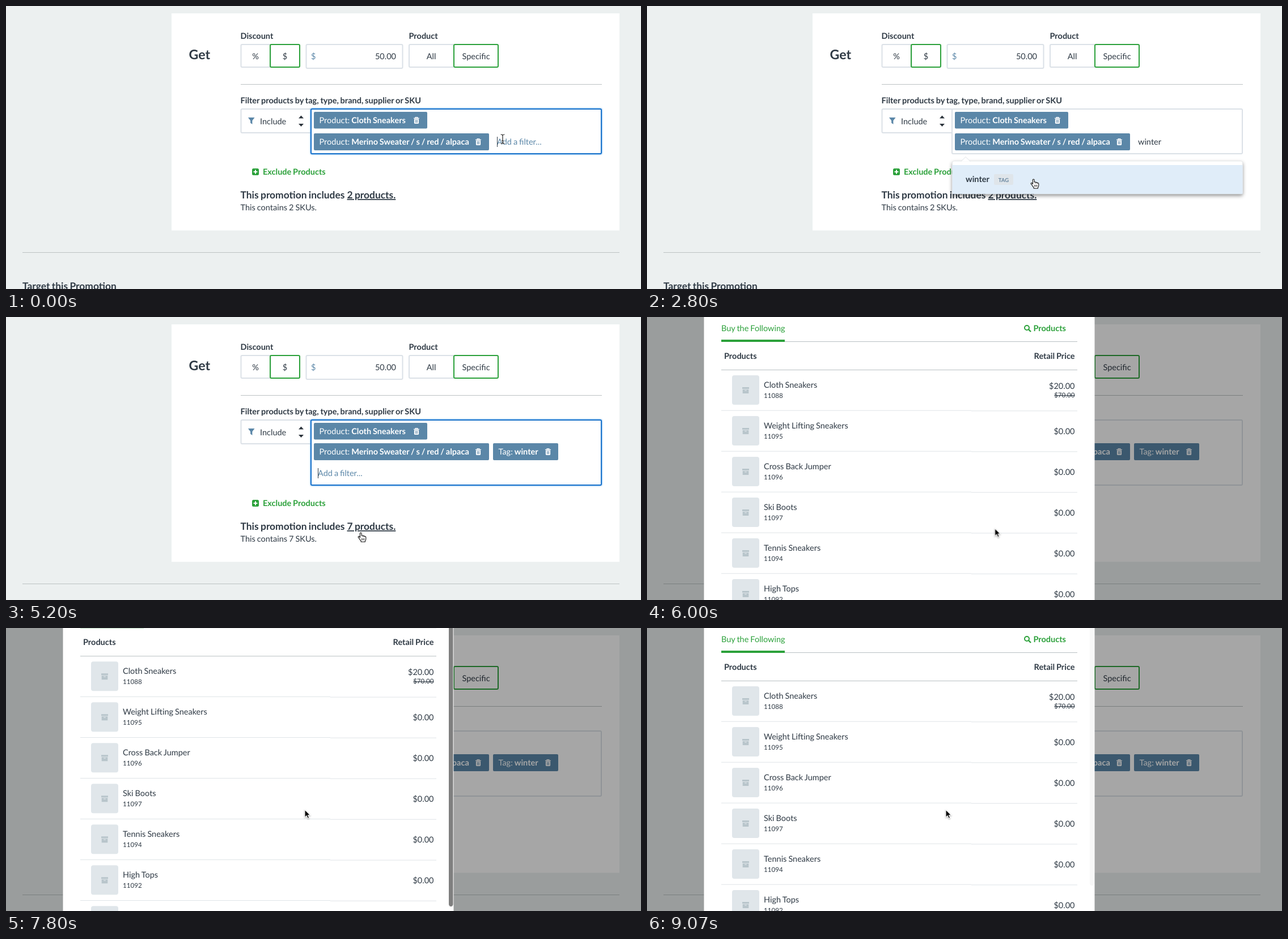
An HTML page that plays this animation: 1120x500 px, repeating every 9.34 s.

```html
<!DOCTYPE html>
<html lang="en">
<head>
<meta charset="utf-8">
<title>Promotion editor</title>
<style>
html, body { margin: 0; width: 100%; height: 100%; overflow: hidden; background: #ecf0f0; }
svg { display: block; width: 1120px; height: 500px; }
text {
  font: 14.5px Lato, "Open Sans", sans-serif; word-spacing: -.05em;
  fill: #2f3a45; white-space: pre; text-rendering: geometricPrecision;
}
.b { font-weight: 700; }
.h { font-size: 17.4px; font-weight: 700; }
.sm { font-size: 11.6px; }
.end { text-anchor: end; }
.mid { text-anchor: middle; }
.u { text-decoration: underline; }
.slate { fill: #5b87a8; }
.green { fill: #2ca13b; }
.white { fill: #fff; }
.line { fill: #fff; stroke: #dbe1e7; stroke-width: 2; }
.on { fill: none; stroke: #2ca13b; stroke-width: 2; }

.a { animation: 9340ms step-end infinite; }
.lower { animation-name: lower; }
.chip2 { animation-name: lift; }
.grow { animation-name: grow; }
.focus { animation-name: focus; filter: drop-shadow(0 0 1.5px #3d9bf0); }
.tag { animation-name: tag; }
.count2 { animation-name: count2; }
.count7 { animation-name: count7; }
.hint1 { animation-name: hint1; }
.hint2 { animation-name: hint2; }
.typed { animation-name: typed; }
.key { animation-name: key; }
.last { animation-name: last; }
.caret { animation-name: caret; }
.drop { animation-name: drop; }
.hover { animation-name: hover; }
.shade { animation-name: shade; animation-timing-function: linear; }
.modal { animation-name: modal; animation-timing-function: ease-out; }
.scroll { animation-name: scroll; animation-timing-function: linear; }
.thumb { animation-name: thumb; animation-timing-function: linear; }
.bar { animation-name: bar; animation-timing-function: linear; }
.mouse { animation-name: mouse; animation-timing-function: ease-in-out; }
.ibeam { animation-name: ibeam; }
.arrow { animation-name: arrow; }
.hand { animation-name: hand; }

@keyframes lower { 0% { transform: none } 32.12%, 100% { transform: translateY(36px) } }
@keyframes lift { 0% { transform: none } 32.12%, 100% { transform: translateY(-2px) } }
@keyframes grow { 0% { height: 79px } 32.12%, 100% { height: 115px } }
@keyframes focus { 0% { opacity: 1 } 29.98% { opacity: 0 } 32.87% { opacity: 1 } 56.42%, 100% { opacity: 0 } }
@keyframes tag { 0% { opacity: 0 } 32.12%, 100% { opacity: 1 } }
@keyframes count2 { 0% { opacity: 1 } 34.26%, 100% { opacity: 0 } }
@keyframes count7 { 0% { opacity: 0 } 34.26%, 100% { opacity: 1 } }
@keyframes hint1 { 0% { opacity: 1 } 6.42%, 100% { opacity: 0 } }
@keyframes hint2 { 0% { opacity: 0 } 32.12%, 100% { opacity: 1 } }
@keyframes typed { 0% { opacity: 0 } 6.42% { opacity: 1 } 32.12%, 100% { opacity: 0 } }
@keyframes key { 0% { opacity: 1 } 50%, 100% { opacity: 0 } }
@keyframes last { 0% { opacity: .6 } 14.24%, 100% { opacity: 1 } }
@keyframes caret {
  0% { opacity: 1; transform: none }
  .75% { opacity: 0; transform: none }
  6.42% { opacity: 1; transform: translateX(11px) }
  7.82% { opacity: 1; transform: translateX(15px) }
  9.31% { opacity: 1; transform: translateX(23px) }
  10.71% { opacity: 1; transform: translateX(28px) }
  12.1% { opacity: 1; transform: translateX(36px) }
  14.24% { opacity: 1; transform: translateX(42px) }
  19.59% { opacity: 0; transform: translateX(42px) }
  24.95% { opacity: 1; transform: translateX(42px) }
  29.98% { opacity: 0; transform: translateX(42px) }
  32.12% { opacity: 1; transform: translate(-316px, 36px) }
  37.15% { opacity: 0; transform: translate(-316px, 36px) }
  42.83% { opacity: 1; transform: translate(-316px, 36px) }
  48.18% { opacity: 0; transform: translate(-316px, 36px) }
  53.53% { opacity: 1; transform: translate(-316px, 36px) }
  56.42%, 100% { opacity: 0; transform: translate(-316px, 36px) }
}
@keyframes drop { 0% { opacity: 0 } 10.71% { opacity: 1 } 32.12%, 100% { opacity: 0 } }
@keyframes hover { 0% { opacity: 0 } 23.13% { opacity: 1 } 32.12%, 100% { opacity: 0 } }
@keyframes shade { 0%, 57.82% { opacity: 0 } 59.96%, 100% { opacity: 1 } }
@keyframes modal {
  0%, 58.57% { opacity: 0; transform: translateY(-40px) }
  62.1%, 100% { opacity: 1; transform: none }
}
@keyframes scroll {
  0%, 72.06% { transform: translateY(45px) }
  74.2% { transform: none }
  75.7%, 82.12% { transform: translateY(-4px) }
  88.54% { transform: translateY(20px) }
  92.08%, 100% { transform: translateY(45px) }
}
@keyframes thumb {
  0%, 72.06% { transform: translateY(-38px) }
  74.2% { transform: none }
  75.7%, 82.12% { transform: translateY(3px) }
  88.54% { transform: translateY(-17px) }
  92.08%, 100% { transform: translateY(-38px) }
}
@keyframes bar { 0%, 72% { opacity: 0 } 72.1%, 92.83% { opacity: 1 } 97.1%, 100% { opacity: .06 } }
@keyframes mouse {
  0%, 17.13% { transform: translate(876px, 235px) }
  27.84%, 42.08% { transform: translate(682px, 306px) }
  51.39%, 62.85% { transform: translate(626px, 381px) }
  68.52%, 100% { transform: translate(527px, 321px) }
}
@keyframes ibeam { 0% { opacity: 1 } 6.42% { opacity: 0 } 17.13% { opacity: 1 } 21.63%, 100% { opacity: 0 } }
@keyframes arrow {
  0% { opacity: 0 } 21.63% { opacity: 1 } 23.13% { opacity: 0 } 32.12% { opacity: 1 }
  48.18% { opacity: 0 } 59.96%, 100% { opacity: 1 }
}
@keyframes hand { 0% { opacity: 0 } 23.13% { opacity: 1 } 32.12% { opacity: 0 } 48.18% { opacity: 1 } 59.96%, 100% { opacity: 0 } }
</style>
</head>
<body>
<svg viewBox="0 0 1120 500">
  <defs>
    <g id="bin">
      <path d="M3.2 2V.6H6.8V2M0 2.3H10" fill="none" stroke="#fff" stroke-width="1.3"/>
      <path d="M.9 3.6H9.1V10.6Q9.1 12 7.8 12H2.2Q.9 12 .9 10.6Z" fill="#fff"/>
      <path d="M3.4 5V10.4M5 5V10.4M6.6 5V10.4" stroke="#5b87a8" stroke-width=".8"/>
    </g>
    <g id="pic">
      <rect x="150" y="10" width="48" height="52" rx="4" fill="#e0e6ea"/>
      <path d="M168 31H180V34H168ZM168.7 35H179.3V42H168.7Z" fill="#b8c5cb"/>
      <path d="M172.3 36.8H175.7" stroke="#e0e6ea" stroke-width="1.2"/>
    </g>
    <path id="beam" d="M-3 -8Q0 -8 0 -6Q0 -8 3 -8M0 -6V6M-3 8Q0 8 0 6Q0 8 3 8M-1.5 3H1.5"/>
  </defs>

  <rect width="1120" height="500" fill="#ecf0f0"/>
  <rect class="white" x="292" y="13" width="790" height="300"/>
  <g class="a lower">
    <rect class="white" x="292" y="200" width="790" height="196.5"/>
    <rect class="green" x="434" y="287" width="12" height="12" rx="2.5"/>
    <path d="M440 289.6V296.4M436.6 293H443.4" stroke="#fff" stroke-width="2"/>
    <text class="b green" x="453" y="298">Exclude Products</text>
    <text class="h" x="413.5" y="340">This promotion includes</text>
    <g class="a count2">
      <text class="h u" x="601.5" y="340">2 products.</text>
      <text x="413.5" y="361">This contains 2 SKUs.</text>
    </g>
    <g class="a count7">
      <text class="h u" x="601.5" y="340">7 products.</text>
      <text x="413.5" y="361">This contains 7 SKUs.</text>
    </g>
    <rect x="29" y="435" width="1053" height="1" fill="#bcc2c3"/>
    <text class="h" x="29" y="501">Target this Promotion</text>
  </g>

  <text class="b" x="322.5" y="94" style="font-size:23.2px">Get</text>
  <text class="b" x="413.5" y="58">Discount</text>
  <text class="b" x="710.5" y="58">Product</text>
  <rect class="line" x="414.5" y="68" width="52" height="40" rx="2"/>
  <rect class="on" x="466" y="68" width="52" height="40" rx="2"/>
  <text class="mid" x="440" y="94">%</text>
  <text class="mid" x="492" y="94">$</text>
  <rect class="line" x="529.5" y="68" width="170" height="42" rx="2"/>
  <text class="slate" x="538" y="94">$</text>
  <text class="end" x="688" y="94">50.00</text>
  <rect class="line" x="711" y="68" width="79" height="40" rx="2"/>
  <rect class="on" x="790" y="68" width="78" height="40" rx="2"/>
  <text class="mid" x="750" y="94">All</text>
  <text class="mid" x="829" y="94">Specific</text>
  <rect x="414" y="138" width="637" height="1" fill="#bcc2c3"/>
  <text class="b" x="413.5" y="172">Filter products by tag, type, brand, supplier or SKU</text>

  <rect class="line" x="414.5" y="182" width="124" height="42" rx="2"/>
  <path class="slate" d="M427 197H438.5L434.4 202.4V209L431.1 206.6V202.4Z"/>
  <text x="448" y="208.5">Include</text>
  <path d="M516 198.5L520.5 193.5L525 198.5ZM516 208L520.5 213L525 208Z" fill="#2b333b"/>
  <rect class="line a grow" x="538" y="182" width="512" height="79" rx="2"/>
  <g class="a focus">
    <rect class="a grow" x="538" y="182" width="512" height="79" rx="2" fill="#fff" stroke="#1972ca" stroke-width="2"/>
  </g>

  <rect class="slate" x="543" y="187" width="200" height="29.5" rx="2"/>
  <text class="white" x="552.5" y="207">Product: <tspan class="b">Cloth Sneakers</tspan></text>
  <use href="#bin" x="719" y="196"/>
  <g class="a chip2">
    <rect class="slate" x="543" y="225" width="309" height="30" rx="2"/>
    <text class="white" x="552.5" y="245">Product: <tspan class="b">Merino Sweater / s / red / alpaca</tspan></text>
    <use href="#bin" x="828" y="234"/>
  </g>
  <g class="a tag">
    <rect class="slate" x="859" y="223" width="115" height="30" rx="2"/>
    <text class="white" x="868.5" y="243">Tag: <tspan class="b">winter</tspan></text>
    <use href="#bin" x="951" y="232"/>
  </g>
  <text class="slate a hint1" x="866" y="245">Add a filter...</text>
  <text class="slate a hint2" x="550" y="281">Add a filter...</text>
  <g class="a typed" id="typed"></g>
  <rect class="a caret" x="866" y="231" width="1" height="18" fill="#2f3a45"/>

  <g class="a drop">
    <g style="filter:drop-shadow(0 3px 3px rgba(0,0,0,.42))">
      <rect x="538.5" y="274" width="512" height="58" rx="3" fill="#fff" stroke="#e3e6e8" stroke-width=".8"/>
    </g>
    <path d="M554 274.5L562 266.5L570 274.5" fill="#fff" stroke="#dde2e6"/>
    <rect class="a hover" x="538.5" y="281" width="512" height="51" fill="#e0edf9"/>
    <text class="b" x="562" y="311">winte<tspan class="a last">r</tspan></text>
    <rect x="612" y="297" width="34" height="19" rx="2" fill="#dfe5ea"/>
    <text class="b mid" x="629" y="310.5" style="font-size:9.5px;fill:#66849e">TAG</text>
  </g>

  <rect class="a shade" width="1120" height="500" fill="rgba(0,0,0,.35)"/>
  <g class="a modal">
    <rect class="white" x="100.5" y="-20" width="689" height="580"/>
    <g class="a scroll" id="list">
      <text class="green" x="131" y="-20">Buy the Following</text>
      <circle cx="670" cy="-26" r="4" fill="none" stroke="#2ca13b" stroke-width="2"/>
      <path d="M673 -23L677 -19" stroke="#2ca13b" stroke-width="2.4"/>
      <text class="b green end" x="739" y="-20">Products</text>
      <rect x="131" y="-2" width="628" height="1" fill="#b9c0c3"/>
      <rect class="green" x="131" y="-5" width="112" height="4"/>
      <text class="b" x="136" y="28.5">Products</text>
      <text class="b end" x="754.5" y="28.5">Retail Price</text>
      <rect x="131" y="48" width="628" height="1" fill="#b9c0c3"/>
    </g>
    <g class="a bar">
      <rect class="a thumb" x="781" y="-300" width="7.5" height="793" rx="3.7" fill="#7f7f7f"/>
    </g>
  </g>

  <g class="a mouse">
    <g class="a ibeam" fill="none" stroke-linecap="round">
      <use href="#beam" stroke="#fff" stroke-width="2.6" opacity=".7"/>
      <use href="#beam" stroke="#222" stroke-width="1.2"/>
    </g>
    <path class="a arrow" d="M0 0V13.6L3.1 10.7L5.3 15.6L7.7 14.6L5.6 9.8H9.8Z" fill="#000" stroke="#fff" stroke-width="1.1" style="filter:drop-shadow(0 1px 1px rgba(0,0,0,.35))"/>
    <g class="a hand">
      <path d="M-1.6 9V1.2Q-1.6 0 -.3 0Q1.1 0 1.1 1.2V5.6Q1.4 4.6 2.6 4.8Q3.8 5 3.8 6.2Q4.3 5.3 5.4 5.6Q6.4 5.9 6.4 7Q7 6.3 7.9 6.7Q8.8 7.1 8.8 8.4V11Q8.8 13 7.4 15V16.2H.2V14.8Q-1.6 13 -2.6 11L-4.6 8.4Q-5.2 7.2 -4.3 6.6Q-3.4 6.1 -2.4 7.2Z" fill="#fff" stroke="#111" stroke-width="1.1"/>
      <path d="M1.4 10V13.4M3.6 10V13.4M5.8 10V13.4" stroke="#111" stroke-width=".9"/>
    </g>
  </g>
</svg>
<script>
const LOOP = 9340;
const presses = [600, 730, 870, 1000, 1130, 1270];

// Each letter shows from its key press on; the enclosing group ends them all.
const pen = document.createElement("canvas").getContext("2d");
pen.font = '14.5px Lato, "Open Sans", sans-serif';
document.getElementById("typed").innerHTML = [..."winter"].map((c, i) => {
  const x = 866 + pen.measureText("winter".slice(0, i)).width;
  return `<g class="a key" style="animation-delay:${presses[i] - LOOP}ms">` +
    `<text${i === 5 ? ' class="a last"' : ""} x="${x}" y="245">${c}</text></g>`;
}).join("");

const products = [
  ["Cloth Sneakers", 11088], ["Weight Lifting Sneakers", 11095], ["Cross Back Jumper", 11096],
  ["Ski Boots", 11097], ["Tennis Sneakers", 11094], ["High Tops", 11092],
  ["Merino Sweater / s / red / alpaca", ""]
];
const price = i => i
  ? '<text class="end" x="754.5" y="42">$0.00</text>'
  : '<text class="end" x="754.5" y="34">$20.00</text>' +
    '<text class="sm end" x="754.5" y="49" style="text-decoration:line-through">$70.00</text>';

document.getElementById("list").insertAdjacentHTML("beforeend", products.map(([name, sku], i) =>
  `<g transform="translate(0 ${48 + 72 * i})"><use href="#pic"/>
    <text x="206" y="32">${name}</text><text class="sm" x="206" y="50">${sku}</text>${price(i)}
    <path d="M131 72.2H572M572 72.9H759" stroke="#dfe4e7"/></g>`).join(""));
</script>
</body>
</html>
```
